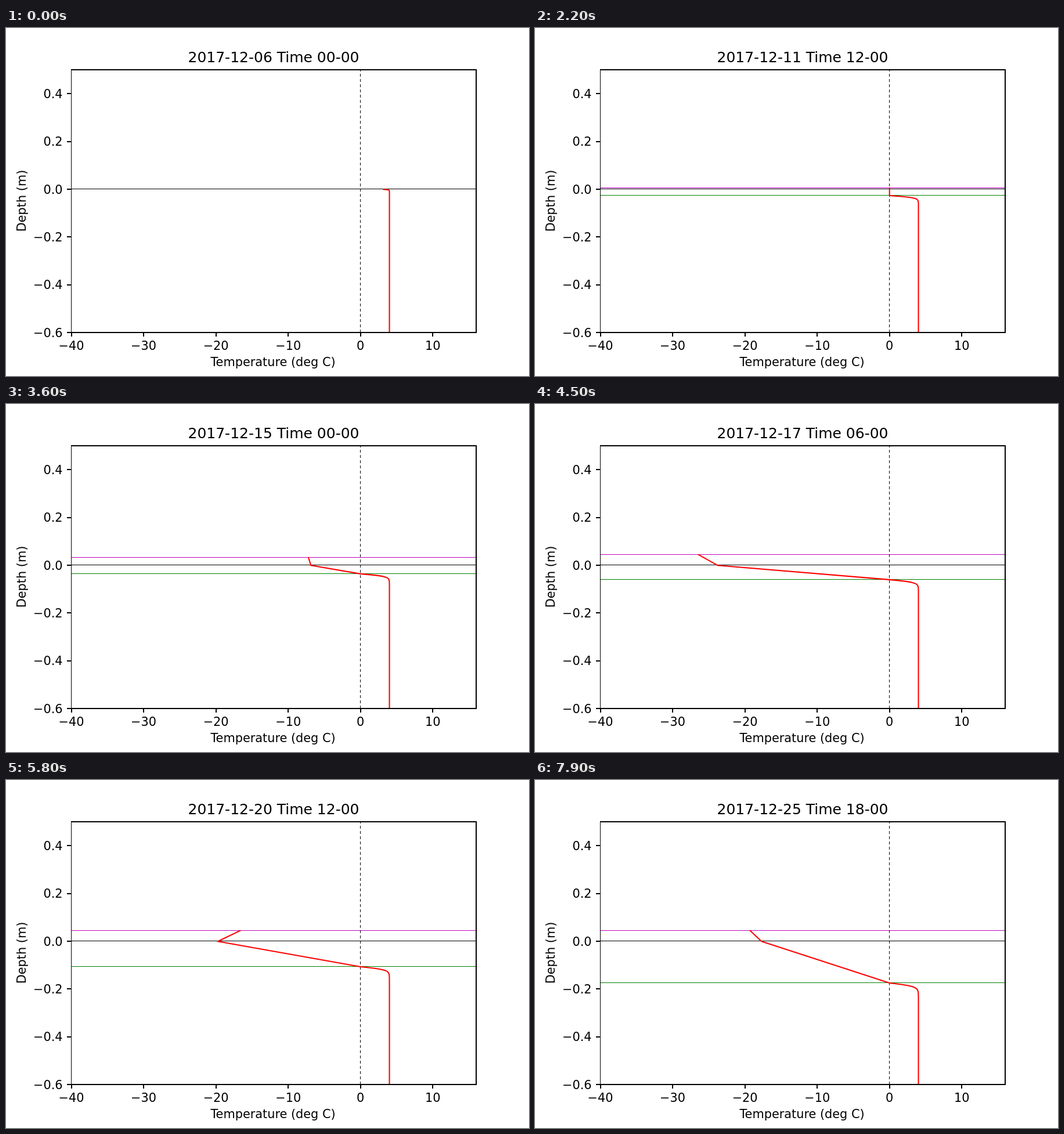
Write an HTML page with a canvas that moves like this. It is 901 px wide and 600 px high and loops after 8 s.

```html
<!DOCTYPE html>
<html lang="en">
<head>
<meta charset="utf-8">
<title>Temperature profile</title>
<style>
html, body { margin: 0; width: 100%; height: 100%; overflow: hidden; background: #fff; }
canvas { display: block; }
</style>
</head>
<body>
<canvas id="plot" width="901" height="600"></canvas>
<script>
const ctx = document.getElementById('plot').getContext('2d');
const FONT = '"DejaVu Sans", sans-serif';
const LEFT = 112.5, RIGHT = 810, TOP = 72, BOTTOM = 525;
const STEP_MS = 100, STEPS = 80, STEP_HOURS = 6;
const START = Date.UTC(2017, 11, 6);

const px = temp => LEFT + (temp + 40) * (RIGHT - LEFT) / 56;
const py = depth => TOP + (0.5 - depth) * (BOTTOM - TOP) / 1.1;

// Weather turning points: step, ice depth, ice surface and snow surface temperature
const KEYS = [
  [0, 0, 3.2, 3.2],
  [4, 0, 0, 0],
  [9, 0.015, -4, -4],
  [20, 0.026, 0, 0],
  [27, 0.026, 0, 0],
  [36, 0.0354, -6.85, -7.2],
  [45, 0.0597, -23.75, -26.4],
  [58, 0.1059, -19.73, -16.67],
  [69, 0.14, -26.46, -27.5],
  [79, 0.174, -17.7, -19.25]
];

function stateAt(step) {
  const i = Math.max(1, KEYS.findIndex(key => key[0] >= step));
  const a = KEYS[i - 1], b = KEYS[i];
  const k = (step - a[0]) / (b[0] - a[0]);
  const [, ice, base, top] = a.map((v, j) => v + (b[j] - v) * k);
  const snow = Math.min(0.0447, Math.max(0, (step - 19) * 0.0019));
  const mix = 0.9 + 0.56 * Math.sqrt(step); // warm layer scale in pixels
  return { ice, base, top, snow, mix };
}

function text(str, x, y, size, align) {
  ctx.font = size + 'px ' + FONT;
  ctx.textAlign = align;
  ctx.fillText(str, x, y);
}

function level(depth, color) {
  ctx.fillStyle = color;
  ctx.fillRect(113, Math.floor(py(depth)), 696, 1);
}

function axes() {
  ctx.fillStyle = '#000';
  ctx.fillRect(112, 71, 1, 455);
  ctx.fillRect(809, 71, 2, 455);
  ctx.fillRect(112, 71, 699, 2);
  ctx.fillRect(112, 524, 699, 2);
  const label = (v, digits) => v.toFixed(digits).replace('-', '\u2212');
  for (let t = -40; t <= 10; t += 10) {
    const x = px(t);
    ctx.fillRect(Math.round(x) - 1, BOTTOM, 2, 7);
    text(label(t, 0), x, 555, 20.83, 'center');
  }
  for (let i = -3; i <= 2; i++) {
    const y = py(i / 5);
    ctx.fillRect(105, Math.round(y) - 1, 7, 2);
    text(label(i / 5, 1), 97.5, Math.round(y + 7.6), 20.83, 'right');
  }
  text('Temperature (deg C)', 460, 583, 20.83, 'center');
  ctx.save();
  ctx.translate(34, 298);
  ctx.rotate(-Math.PI / 2);
  text('Depth (m)', 0, 0, 20.83, 'center');
  ctx.restore();
}

function zeroLine() {
  ctx.strokeStyle = '#000';
  ctx.lineWidth = 1;
  ctx.lineCap = 'butt';
  ctx.setLineDash([5, 4]);
  ctx.beginPath();
  ctx.moveTo(610.5, BOTTOM);
  ctx.lineTo(610.5, TOP);
  ctx.stroke();
  ctx.setLineDash([]);
}

function profile({ ice, base, top, snow, mix }) {
  const from = ice > 0 ? 0 : base, iceY = py(-ice) + 0.4;
  ctx.beginPath();
  if (snow > 0) ctx.moveTo(px(top), py(snow) + 0.4);
  ctx.lineTo(px(base), py(0) + 0.4);
  for (let z = 0; z <= mix * 5; z += 0.5) {
    ctx.lineTo(px(from + (4 - from) * Math.tanh(z / mix)), iceY + z);
  }
  ctx.lineTo(px(4), BOTTOM);
  ctx.strokeStyle = '#f00';
  ctx.lineWidth = 2.08;
  ctx.lineCap = 'square';
  ctx.lineJoin = 'round';
  ctx.stroke();
}

function draw(step) {
  const state = stateAt(step);
  ctx.fillStyle = '#fff';
  ctx.fillRect(0, 0, 901, 600);

  ctx.save();
  ctx.beginPath();
  ctx.rect(LEFT, TOP, RIGHT - LEFT, BOTTOM - TOP);
  ctx.clip();
  level(0, '#000');
  if (state.snow > 0) level(state.snow, '#bf00bf');
  if (state.ice > 0) level(-state.ice, '#008000');
  zeroLine();
  profile(state);
  ctx.restore();

  axes();
  const iso = new Date(START + step * STEP_HOURS * 3600e3).toISOString();
  text(iso.slice(0, 10) + ' Time ' + iso.slice(11, 13) + '-00', 461, 59, 25, 'center');
}

function tick() {
  draw(Math.floor(performance.now() / STEP_MS) % STEPS);
  requestAnimationFrame(tick);
}
tick();
</script>
</body>
</html>
```
